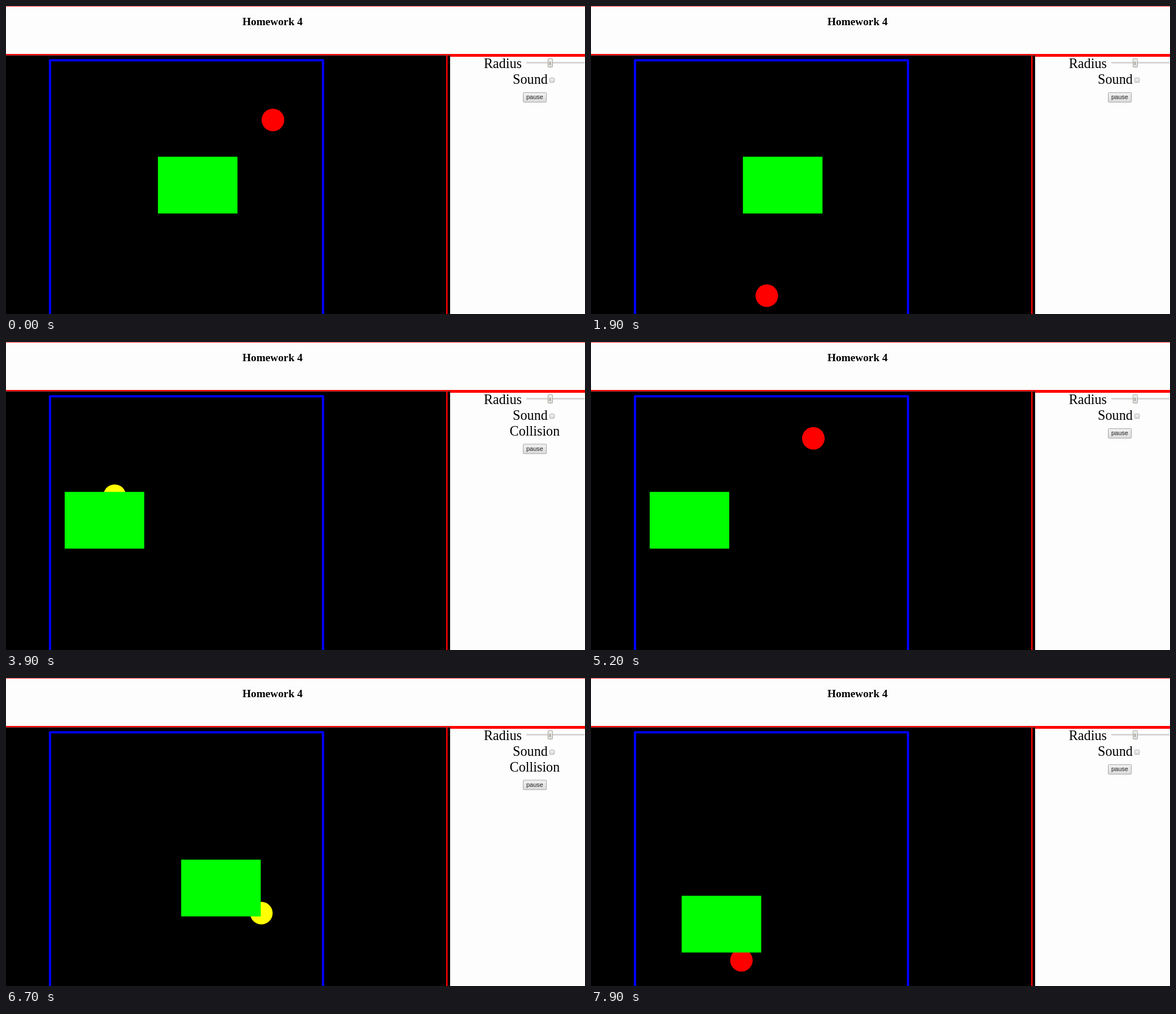
Animation, 1026 px wide and 546 px high, one loop 8000 ms. Source, as an HTML page with a canvas:

```html
<!DOCTYPE html>
<html lang="en">
<head>
<meta charset="utf-8">
<title>Homework 4</title>
<style>
  html, body { margin: 0; width: 100%; height: 100%; overflow: hidden; background: #fdfdfd; }
  canvas { display: block; }
</style>
</head>
<body>
<canvas id="stage" width="1026" height="546"></canvas>
<script>
const ctx = document.getElementById('stage').getContext('2d');
const LOOP = 8000, STEP = 100;

// The ball moves at constant speed (px/s) and bounces between lo and hi on each axis.
const RADIUS = 20;
const AXIS_X = { start: 473, speed: 155, lo: 97, hi: 539.5 };
const AXIS_Y = { start: 202, speed: 164, lo: 115, hi: 557 };

// The block is put down at a new place now and then.
const BLOCK = { w: 141, h: 100.6 };
const PLACES = [
  { from: 0, x: 269.2, y: 267.2 },
  { from: 3100, x: 104, y: 265.7 },
  { from: 5500, x: 310.4, y: 322 },
  { from: 7700, x: 160.6, y: 386 },
];

function bounce({ start, speed, lo, hi }, t) {
  const span = hi - lo;
  const travelled = start - lo + speed * t / 1000;
  return hi - Math.abs(travelled % (2 * span) - span);
}

const ballAt = t => ({ x: bounce(AXIS_X, t), y: bounce(AXIS_Y, t) });
const blockAt = t => PLACES.findLast(place => t >= place.from);

function touching(t) {
  const ball = ballAt(t), block = blockAt(t);
  const dx = Math.max(block.x - ball.x, 0, ball.x - block.x - BLOCK.w);
  const dy = Math.max(block.y - ball.y, 0, ball.y - block.y - BLOCK.h);
  return Math.hypot(dx, dy) < RADIUS;
}

function box(color, x, y, w, h) {
  ctx.fillStyle = color;
  ctx.fillRect(x, y, w, h);
}

function text(str, x, y, font, color = '#000') {
  ctx.fillStyle = color;
  ctx.font = font;
  ctx.fillText(str, x, y);
}

function control(x, y, w, h, border) {
  const shade = ctx.createLinearGradient(0, y, 0, y + h);
  shade.addColorStop(0, '#f2f2f2');
  shade.addColorStop(1, '#dadada');
  ctx.beginPath();
  ctx.roundRect(x + .5, y + .5, w - 1, h - 1, 1);
  ctx.fillStyle = shade;
  ctx.fill();
  ctx.strokeStyle = border;
  ctx.lineWidth = 1;
  ctx.stroke();
}

function drawPage() {
  box('#fdfdfd', 0, 0, 1026, 546);
  box('#f00', 0, 0, 1026, .8);
  box('#f00', 0, 85, 1026, 2.6);
  box('#f00', 787, 85, 239, 5);
  text('Homework 4', 419, 34, 'bold 19.3px "Liberation Serif", serif');
}

function drawPanel(colliding) {
  const serif = '24.2px "Liberation Serif", serif';
  text('Radius', 846.7, 110, serif);
  box('#d6d6d6', 922, 99, 103, 3);
  control(960, 93, 9, 16, '#a5a295');
  for (let y = 99; y < 104; y += 2) box('#918e80', 962, y, 4, 1);
  text('Sound', 898, 138, serif);
  control(963, 127, 9, 9, '#adadad');
  if (colliding) text('Collision', 892.6, 165.5, serif);
  const top = colliding ? 180.5 : 153;
  control(916, top, 42, 18, '#a6a6a6');
  text('pause', 922, top + 12, '11px "Liberation Sans", sans-serif', '#222');
}

function drawArena(t, colliding) {
  box('#000', 0, 87.6, 787, 459);
  box('#f00', 780, 87.6, 2.5, 459);
  ctx.strokeStyle = '#00f';
  ctx.lineWidth = 4;
  ctx.lineJoin = 'round';
  ctx.strokeRect(78, 96.2, 483.7, 482);

  const ball = ballAt(t), block = blockAt(t);
  ctx.fillStyle = colliding ? '#ff0' : '#f00';
  ctx.beginPath();
  ctx.arc(ball.x, ball.y, RADIUS, 0, 2 * Math.PI);
  ctx.fill();
  box('#0f0', block.x, block.y, BLOCK.w, BLOCK.h);
}

function frame() {
  const t = Math.floor(performance.now() % LOOP / STEP) * STEP;
  // The page reacts to contact one step late.
  const colliding = touching(Math.max(0, t - STEP));
  drawPage();
  drawPanel(colliding);
  drawArena(t, colliding);
  requestAnimationFrame(frame);
}
frame();
</script>
</body>
</html>
```
